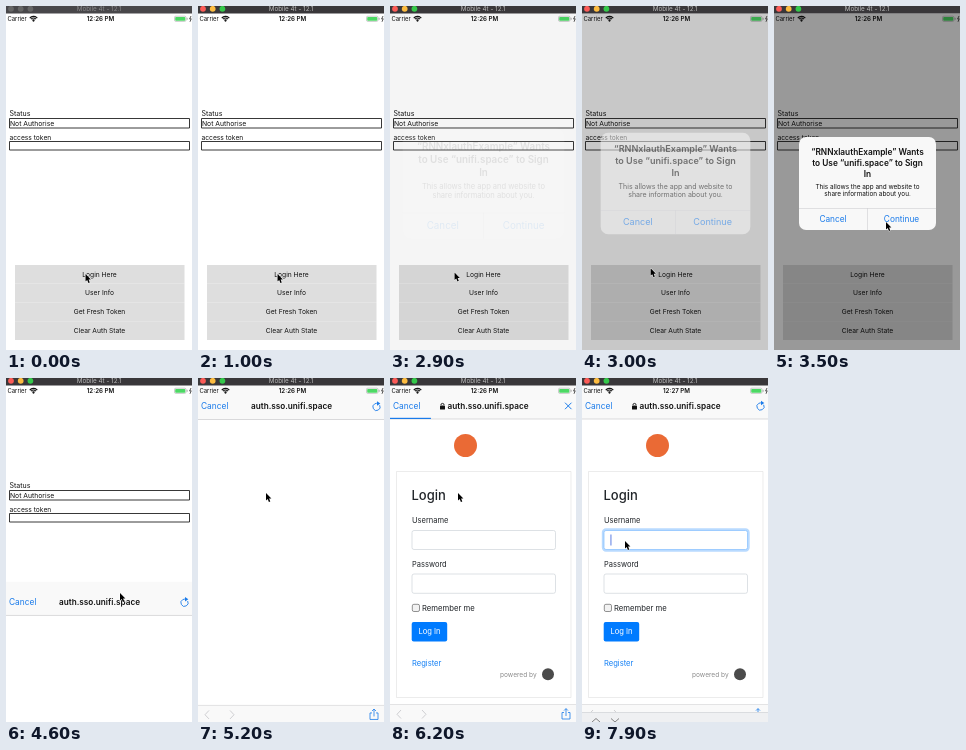
Recreate the animation shown at these times as an HTML page with a canvas. Size 186 px wide and 344 px high, loop 8 s.

```html
<!DOCTYPE html>
<html lang="en">
<head>
<meta charset="utf-8">
<title>Sign-in flow</title>
<style>
html, body { margin: 0; width: 100%; height: 100%; overflow: hidden; background: #fff; }
canvas { display: block; width: 186px; height: 344px; }
</style>
</head>
<body>
<canvas id="stage"></canvas>
<script>
const W = 186, H = 344, LOOP = 8000;
const BLUE = '#1a7bea', FONT = 'Inter, "Liberation Sans", sans-serif';
const canvas = document.getElementById('stage');
const c = canvas.getContext('2d');
const dpr = window.devicePixelRatio || 1;
canvas.width = W * dpr;
canvas.height = H * dpr;

const clamp = v => Math.max(0, Math.min(1, v));
const span = (t, a, b) => clamp((t - a) / (b - a));
const easeOut = p => 1 - (1 - p) * (1 - p);
const smooth = p => p * p * (3 - 2 * p);

// Pointer waypoints: time, x, y
const path = [
  [0, 79.5, 268], [1950, 79.5, 268], [2400, 75, 244], [2800, 64.5, 266.5],
  [2890, 64.5, 266.5], [3500, 112, 216], [3850, 112, 216], [4150, 114, 216],
  [4600, 114, 215], [4720, 114, 215], [5200, 68, 115], [6250, 68, 115],
  [7200, 43, 163], [LOOP, 43, 163]
];

function pointerAt(t) {
  let i = 1;
  while (path[i][0] < t) i++;
  const [t0, x0, y0] = path[i - 1], [t1, x1, y1] = path[i];
  const p = smooth(span(t, t0, t1));
  return [x0 + (x1 - x0) * p, y0 + (y1 - y0) * p];
}

function rect(x, y, w, h, fill) {
  c.fillStyle = fill;
  c.fillRect(x, y, w, h);
}

function box(x, y, w, h, r, fill, stroke, line = 0.7) {
  c.beginPath();
  c.roundRect(x, y, w, h, r);
  if (fill) { c.fillStyle = fill; c.fill(); }
  if (stroke) { c.strokeStyle = stroke; c.lineWidth = line; c.stroke(); }
}

function dot(x, y, r, fill) {
  c.beginPath();
  c.arc(x, y, r, 0, Math.PI * 2);
  c.fillStyle = fill;
  c.fill();
}

function line(points, stroke, width) {
  c.beginPath();
  points.forEach(([x, y]) => c.lineTo(x, y));
  c.strokeStyle = stroke;
  c.lineWidth = width;
  c.stroke();
}

// y is the middle of the lower-case letters
function text(s, x, y, size, { color = '#111', weight = 400, align = 'left' } = {}) {
  c.font = `${weight} ${size}px ${FONT}`;
  c.textAlign = align;
  c.textBaseline = 'alphabetic';
  c.fillStyle = color;
  c.fillText(s, x, y + size * 0.35);
}

function appScreen(t) {
  rect(0, 0, W, H, '#fff');
  text('Status', 3.5, 108, 7);
  box(3.5, 112.5, 180, 9.5, 0, '#fff', '#222', 0.9);
  text('Not Authorise', 4, 117.3, 6.8);
  text('access token', 3.5, 131.5, 6.7);
  box(3.5, 135.5, 180, 8.5, 0, '#fff', '#222', 0.9);

  const press = span(t, 300, 430) - smooth(span(t, 450, 720));
  ['Login Here', 'User Info', 'Get Fresh Token', 'Clear Auth State'].forEach((label, i) => {
    c.globalAlpha = i ? 1 : 1 - 0.8 * press;
    rect(9, 259 + i * 18.75, 169.5, 18.75, '#dedede');
    text(label, 93.5, 268.3 + i * 18.75, 6.7, { align: 'center' });
    c.globalAlpha = 1;
  });
}

function statusBar(t) {
  text('Carrier', 1.5, 13, 5.9);
  for (const r of [1.5, 3.3, 5]) {
    c.beginPath();
    c.arc(27.5, 15.4, r, -Math.PI * 0.77, -Math.PI * 0.23);
    c.strokeStyle = '#111';
    c.lineWidth = 1.2;
    c.stroke();
  }
  dot(27.5, 14.9, 0.8, '#111');
  text(t < 7600 ? '12:26 PM' : '12:27 PM', 94.5, 13, 6.2, { weight: 600, align: 'center' });
  box(168.5, 10.2, 11.5, 5.2, 1.3, '#fff', '#9a9a9a', 0.5);
  box(169.2, 10.9, 10.1, 3.8, 0.8, '#4cd964');
  rect(180.7, 11.8, 0.8, 2, '#999');
  line([[185, 10], [183.6, 13], [185.2, 12.8], [184, 15.8]], '#111', 0.7);
}

function titleBar(t) {
  const active = t > 300;
  rect(0, 0, W, 7.5, active ? '#39373a' : '#48474a');
  const lights = active ? ['#fc5b57', '#fdbc40', '#34c84a'] : ['#666', '#666', '#666'];
  lights.forEach((fill, i) => dot(5 + i * 9.7, 2.8, 2.9, fill));
  text('Mobile 4t - 12.1', 93, 2.8, 6.3, { color: active ? '#bbb' : '#8b8a8c', align: 'center' });
}

function alertBox(t) {
  const enter = easeOut(span(t, 2882, 3250));
  const shown = enter - easeOut(span(t, 4090, 4370));
  if (shown <= 0) return;
  rect(0, 7.5, W, H, `rgba(0,0,0,${0.4 * shown})`);

  const scale = 1.2 - 0.2 * enter;
  c.save();
  c.globalAlpha = shown;
  c.translate(93.5, 177.5);
  c.scale(scale, scale);
  c.translate(-93.5, -177.5);
  box(25, 131, 137, 93, 7, '#f8f8f8');
  ['“RNNxlauthExample” Wants', 'to Use “unifi.space” to Sign', 'In'].forEach((s, i) =>
    text(s, 93.5, 146 + i * 11, 8.3, { weight: 600, align: 'center' }));
  ['This allows the app and website to', 'share information about you.'].forEach((s, i) =>
    text(s, 93.5, 180.3 + i * 7.5, 6.4, { align: 'center' }));
  rect(25, 202, 137, 0.6, '#cfcfd2');
  rect(93.2, 202, 0.6, 22, '#cfcfd2');
  text('Cancel', 59, 213, 8.3, { color: BLUE, align: 'center' });
  text('Continue', 127.5, 213, 8.3, { color: BLUE, align: 'center' });
  c.restore();
}

function reloadIcon() {
  c.beginPath();
  c.arc(178.5, 28.5, 3.6, -0.5, Math.PI * 1.65);
  c.strokeStyle = BLUE;
  c.lineWidth = 0.9;
  c.stroke();
  c.beginPath();
  c.moveTo(179, 22.8);
  c.lineTo(182.3, 25);
  c.lineTo(179, 27.2);
  c.fillStyle = BLUE;
  c.fill();
}

function navBar(t) {
  const secure = t >= 5600, loading = t >= 5500 && t < 7000;
  rect(0, 7.5, W, 33.5, '#f9f9f9');
  rect(0, 40.7, W, 0.6, '#c4c4c6');
  text('Cancel', 3, 28, 8.4, { color: BLUE });
  text('auth.sso.unifi.space', secure ? 98 : 93.5, 28, 8.2, { weight: 600, align: 'center' });
  if (secure) {
    box(50, 27.6, 5, 4, 0.6, '#111');
    c.beginPath();
    c.arc(52.5, 27, 1.6, Math.PI, 0);
    c.strokeStyle = '#111';
    c.lineWidth = 0.9;
    c.stroke();
  }
  if (loading) {
    line([[175, 24.7], [181.5, 31.2]], BLUE, 1);
    line([[181.5, 24.7], [175, 31.2]], BLUE, 1);
    const done = 0.22 * easeOut(span(t, 5500, 5900)) + 0.78 * smooth(span(t, 6200, 6800));
    c.globalAlpha = 1 - span(t, 6800, 6950);
    rect(0, 39.8, W * done, 1.2, BLUE);
    c.globalAlpha = 1;
  } else {
    reloadIcon();
  }
}

function toolBar() {
  rect(0, 326.5, W, 18, '#f9f9f9');
  rect(0, 326.5, W, 0.5, '#c9c9cb');
  line([[11, 332], [7, 336.3], [11, 340.5]], '#cfcfd2', 1);
  line([[32, 332], [36, 336.3], [32, 340.5]], '#cfcfd2', 1);
  line([[174, 334.5], [172, 334.5], [172, 341], [180, 341], [180, 334.5], [178, 334.5]], BLUE, 0.8);
  line([[176, 338], [176, 330.7]], BLUE, 0.8);
  line([[174, 332.6], [176, 330.6], [178, 332.6]], BLUE, 0.8);
}

function loginPage(t) {
  const ink = { color: '#212529' }, focus = span(t, 7620, 7770);
  dot(75.5, 67.5, 11.5, '#ea6a35');
  box(6.5, 93.5, 174.5, 226, 0, null, '#dfdfdf', 0.6);
  text('Login', 21.5, 117.5, 13, { ...ink, weight: 500 });

  text('Username', 22, 142.3, 7.5, ink);
  if (focus) box(21, 151.5, 145.5, 21, 3, null, `rgba(0,123,255,${0.28 * focus})`, 2.4);
  box(22, 152.5, 143.5, 19, 2, '#fff', focus > 0.5 ? '#80bdff' : '#ced4da');
  if (focus > 0.5) rect(28.5, 156.5, 0.9, 11, '#4a6fe0');

  text('Password', 22, 186, 7.5, ink);
  box(22, 196, 143.5, 19.3, 2, '#fff', '#ced4da');

  box(22.3, 226.3, 7.2, 7.2, 1.6, '#f2f2f2', '#777', 0.8);
  text('Remember me', 32, 230, 7.7, ink);
  box(21.7, 244, 35.5, 19.5, 2, '#007bff');
  text('Log In', 39.5, 253.8, 7.6, { color: '#fff', align: 'center' });
  text('Register', 22, 285.3, 7.6, { color: '#1580f5' });
  text('powered by', 110, 296.7, 6.6, { color: '#8c8c8c' });
  dot(158, 296.3, 6, '#4b4b4b');
}

function sheet(t) {
  if (t < 4486) return;
  // Critically damped spring
  const k = (t - 4486) * 0.0125;
  const rest = (1 + k) * Math.exp(-k);
  c.save();
  c.translate(0, 336.5 * rest);
  rect(0, 7.5, W, H, '#fff');
  if (t >= 6100) loginPage(t);
  toolBar();
  navBar(t);
  c.restore();
}

function keyboard(t) {
  if (t < 7820) return;
  const top = H - 10 * span(t, 7820, 7900) - 60 * span(t, 7900, LOOP);
  rect(0, top, W, H - top, '#eff0f2');
  rect(0, top, W, 0.5, '#c5c6ca');
  line([[10, top + 10], [14, top + 6.5], [18, top + 10]], '#777', 0.9);
  line([[29, top + 6.5], [33, top + 10], [37, top + 6.5]], '#777', 0.9);
  rect(0, top + 22, W, H, '#d2d5da');
}

function pointer(t) {
  const [x, y] = pointerAt(t);
  c.save();
  c.translate(x, y);
  c.beginPath();
  [[0, 0], [0, 7.6], [1.7, 6.1], [2.9, 9], [4.3, 8.4], [3.1, 5.6], [5.4, 5.5]]
    .forEach(([px, py]) => c.lineTo(px, py));
  c.closePath();
  c.lineJoin = 'round';
  c.strokeStyle = '#fff';
  c.lineWidth = 1;
  c.stroke();
  c.fillStyle = '#000';
  c.fill();
  c.restore();
}

function draw(now) {
  const t = now % LOOP;
  c.setTransform(dpr, 0, 0, dpr, 0, 0);
  appScreen(t);
  sheet(t);
  statusBar(t);
  alertBox(t);
  keyboard(t);
  titleBar(t);
  pointer(t);
}

let start;
function tick(now) {
  if (start === undefined) start = now;
  draw(Math.max(0, now - start));
  requestAnimationFrame(tick);
}
requestAnimationFrame(tick);
</script>
</body>
</html>
```
